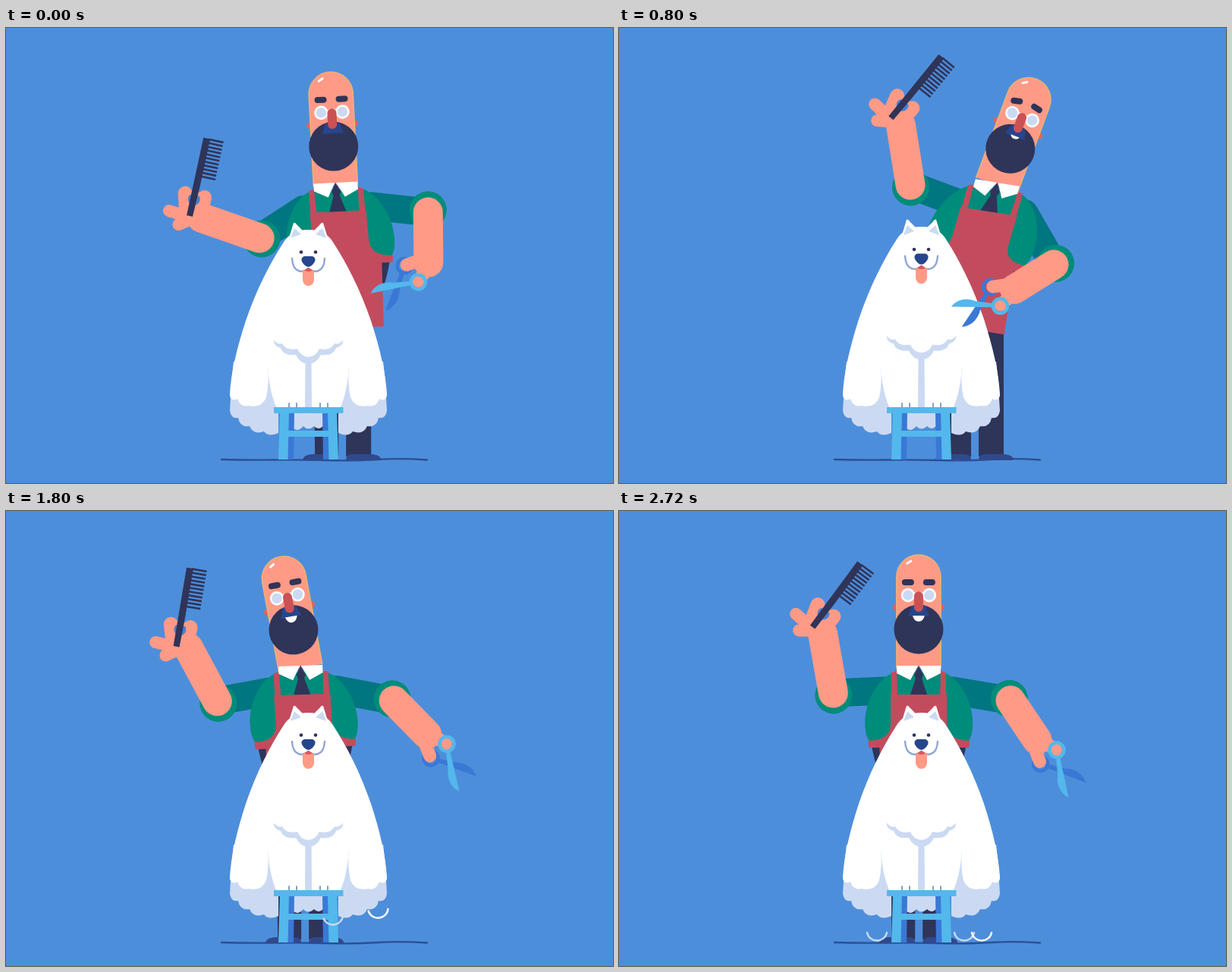
Write an HTML page with a canvas that moves like this. It is 800 px wide and 600 px high and loops after 2760 ms.

```html
<!DOCTYPE html>
<html lang="en">
<head>
<meta charset="utf-8">
<title>Dog groomer</title>
<style>
  html, body { margin: 0; width: 100%; height: 100%; overflow: hidden; background: #4d8edb; }
  canvas { display: block; }
</style>
</head>
<body>
<canvas id="stage" width="800" height="600"></canvas>
<script>
const ctx = document.getElementById('stage').getContext('2d');
const LOOP = 2760;
const RAD = Math.PI / 180;
const C = {
  bg: '#4d8edb', skin: '#ff9a86', dark: '#2f3459', green: '#008c7a', teal: '#007680',
  red: '#c24c5e', nose: '#cb5155', navy: '#27458c', grey: '#cbdaf2', white: '#fff',
  sky: '#53b8ec', blue: '#3a78d6', shoe: '#30498c', ground: '#2b4f96', line: '#8fa5d4'
};

// time, neck x, hip x, head tilt, smile, dog lift,
// left elbow x y, comb x y angle, right elbow x y, scissors x y angle
const KEYS = [
  [0,    434, 443, -2.9, 0, 0,     334, 277, 242, 247, -77,  556, 243, 514, 341, 140],
  [240,  478, 466, -9, 0, 0,       352, 274, 268, 246, -172, 586, 222, 568, 336, 115],
  [520,  466, 461, -7.7, 0, -1,    372, 278, 282, 246, -146, 572, 219, 560, 330, 97.5],
  [800,  498, 469, 20.4, .5, -4,   384, 207, 359, 118, -51,  573, 312, 473, 366, 152.5],
  [1240, 500, 469, 25.7, 1, -4.5,  386, 205, 369, 112, -29,  567, 320, 462, 361, 170],
  [1560, 449, 432, 21, 1, 0,       357, 183, 418, 112, 58,   558, 254, 489, 332, 159],
  [2080, 388, 394, -10.6, 1, 0,    278, 251, 224, 178, -81,  511, 250, 588, 336, 48],
  [2720, 394, 394, 0, 1, 0,        281, 239, 256, 150, -53,  515, 250, 585, 344, 47]
];
const smooth = p => p * p * (3 - 2 * p);
const linear = p => p;
// start, end and easing of the move that leaves each key
const MOVES = [
  [0, 240, p => p * (2 - p)], [240, 520, smooth], [540, 790, smooth], [800, 1240, smooth],
  [1300, 1540, smooth], [1560, 1810, smooth], [2080, 2720, linear], [2720, LOOP, linear]
];
// time, x, y of each falling tuft
const TUFTS = [
  [[1080, 432, 372], [1240, 374, 404], [1560, 334, 481], [2080, 333, 544], [2300, 340, 561]],
  [[960, 440, 376], [1240, 384, 467], [1560, 417, 526], [2080, 450, 556], [2300, 455, 561]],
  [[1280, 450, 376], [1560, 498, 513], [2080, 483, 552], [2300, 478, 561]]
];

const mix = (a, b, p) => a + (b - a) * p;
const clamp = p => Math.min(1, Math.max(0, p));

function poseAt(t) {
  let i = KEYS.length - 1;
  while (KEYS[i][0] > t) i--;
  const [start, end, ease] = MOVES[i];
  const p = ease(clamp((t - start) / (end - start)));
  const next = KEYS[(i + 1) % KEYS.length];
  return KEYS[i].map((v, k) => mix(v, next[k], p));
}

function fill(color, d) {
  ctx.fillStyle = color;
  ctx.fill(new Path2D(d));
}
function stroke(color, width, d) {
  ctx.strokeStyle = color;
  ctx.lineWidth = width;
  ctx.stroke(new Path2D(d));
}
function disc(color, x, y, r) {
  ctx.fillStyle = color;
  ctx.beginPath();
  ctx.arc(x, y, r, 0, 7);
  ctx.fill();
}
function ring(color, width, x, y, r) {
  ctx.strokeStyle = color;
  ctx.lineWidth = width;
  ctx.beginPath();
  ctx.arc(x, y, r, 0, 7);
  ctx.stroke();
}
const limb = (color, width, x1, y1, x2, y2) => stroke(color, width, `M${x1} ${y1}L${x2} ${y2}`);

function group(draw, x = 0, y = 0, angle = 0, sx = 1, sy = 1) {
  ctx.save();
  ctx.translate(x, y);
  ctx.rotate(angle * RAD);
  ctx.scale(sx, sy);
  draw();
  ctx.restore();
}
function skewed(draw, x, y, skewX, skewY) {
  ctx.save();
  ctx.transform(1, skewY, skewX, 1, x, y);
  draw();
  ctx.restore();
}
function mirrored(draw, axis) {
  draw();
  group(draw, axis * 2, 0, 0, -1, 1);
}
// Point given in a rotated local frame
function place(x, y, angle, lx, ly) {
  const c = Math.cos(angle * RAD), s = Math.sin(angle * RAD);
  return [x + lx * c - ly * s, y + lx * s + ly * c];
}

function forearm(ex, ey, wx, wy) {
  const d = Math.hypot(wx - ex, wy - ey);
  disc(C.green, ex - (wx - ex) / d * 3, ey - (wy - ey) / d * 3, 24.5);
  limb(C.skin, 39, ex, ey, wx, wy);
}

function legs() {
  fill(C.dark, 'M-64 -8H64Q60 30 38 80V260H5V100H-5V260H-36L-38 80Q-60 30-64 -8Z');
  fill(C.shoe, 'M5 264Q5 257 14 257H38Q51 258 51 265H5ZM-52 265Q-52 258-39 257H-14Q-5 257-5 264Z');
}

function torso() {
  fill(C.green, 'M-33 6C-55 14-71 45-71 72C-71 90-66 98-60 101H60C66 98 71 90 71 72C71 45 55 14 33 6Z');
  mirrored(() => fill(C.red, 'M-36 6L-29 4L-28 37H-36Z'), 0);
  fill(C.red, 'M-37 35H37V74C38 90 48 95 67 96L66 105H-66L-67 96C-48 95-38 90-37 74Z');
}

function collar() {
  fill(C.dark, 'M0 -3L6 9L4 14L11 35H-11L-4 14L-6 9Z');
  mirrored(() => fill(C.white, 'M-29 -3L-1 -3L-11 16L-29 7Z'), 0);
}

function head(tilt, smile) {
  const shape = 'M-29 0V-120A29 29 0 0 1 29 -120V0';
  mirrored(() => disc('#e5625f', -30, -80, 4), 0);
  fill(C.skin, shape + 'Z');
  stroke('#eab077', 1.8, shape);
  stroke(C.white, 3, 'M-15 -138L-10 -141');
  const brow = Math.max(0, tilt) * .65;
  for (const side of [-1, 1]) {
    group(() => limb(C.dark, 8, -4, 0, 4, 0), side * 14, -113, side * brow);
    disc(C.grey, side * 14, -96, 8);
    ring(C.white, 2.5, side * 14, -96, 8);
  }
  stroke(C.white, 2, 'M-6 -98Q0 -102 6 -98');
  disc(C.dark, 0, -51, 32.5);
  fill(C.navy, 'M-9 -82H9L14 -68H-14Z');
  limb(C.nose, 12, 0, -95, 0, -80);
  if (smile > 0) group(() => fill(C.white, 'M-8 0H8Q6 8 0 8Q-6 8-8 0Z'), 0, -69, 0, mix(.5, 1, smile), smile);
}

function combHand() {
  limb(C.skin, 16, 0, -28, -2, -4);
  limb(C.skin, 16, -15, -12, -5, 2);
  limb(C.skin, 19, 2, -5, 27, -12);
  limb(C.skin, 19, 2, 13, 27, 14);
  disc(C.skin, 0, 5, 13);
  disc('#4680cf', 22, 1, 8);
  limb(C.skin, 5, 29, -8, 30, 9);
  fill(C.dark, 'M-1 -4H104V5H40L-1 4Z');
  for (let i = 0; i < 11; i++) fill(C.dark, `M${52 + i * 5} 3h2.6v20h-2.6Z`);
}

function blade(color) {
  fill(color, 'M-21 -2H35C28 8 14 10 4 6L-21 3Z');
  ring(color, 4.5, -29.5, 0, 9.5);
}

function scissorHand(ex, ey, x, y, angle) {
  group(() => group(() => blade(C.blue), 0, 0, -28.5, 1, -1), x, y, angle);
  forearm(ex, ey, ...place(x, y, angle, -53, -3));
  group(() => {
    limb(C.skin, 17, -48, -8, -27, -13);
    limb(C.skin, 17, -48, 6, -29, 13);
    group(() => blade(C.sky), 0, 0, 28.5);
  }, x, y, angle);
}

function dogFace(blink) {
  mirrored(() => {
    fill(C.white, 'M371 283L379 257Q381 256 383 259L395 271Z');
    fill(C.grey, 'M375 277L380 264L389 272Z');
    if (blink) stroke(C.dark, 1.5, 'M387 295Q389 293 391 295');
    else disc(C.dark, 389, 295.5, 2.3);
  }, 398.5);
  stroke(C.line, 2.4, 'M377 304C378 324 392 323 398.5 317C405 323 419 324 420 304');
  fill(C.skin, 'M391 320Q398.5 315 406 320V332A7.5 8 0 0 1 391 332Z');
  fill('#d9575a', 'M393 319.5L398.5 316L404 319.5Q398.5 323 393 319.5Z');
  fill(C.navy, 'M393 301H404Q409 303 407 308Q403 315 398.5 315Q394 315 390 308Q388 303 393 301Z');
}

function dog(lift, blink) {
  fill(C.grey, 'M378 505H420V523Q412 532 406 525Q398 532 392 525Q384 534 378 527Z');
  mirrored(() => fill(C.grey,
    'M297 470L295 505Q297 516 306 514Q308 527 321 525Q326 537 340 532Q346 540 359 534V470Z'), 398.5);
  group(() => {
    fill(C.white, 'M295 485C296 455 305 420 316 386C330 345 348 310 365 284Q375 266 398.5 266' +
      'Q422 266 432 284C449 310 467 345 481 386C492 420 501 455 502 485L443 500H356Z');
    dogFace(blink);
  }, 0, -500 * -lift / -235 * -1 + 0 * lift, 0, 1, 1 - lift / 235);
  mirrored(() => {
    fill(C.grey, 'M345 446Q347 480 357 502H320L300 470Z');
    fill(C.white, 'M300 440L295 485Q297 493 305 489Q309 501 320 498Q337 502 343 487Q347 470 345 446Z');
    stroke('#8294ba', 1.8, 'M373 495V500M383 495V500');
  }, 398.5);
  group(() => {
    mirrored(() => fill(C.grey, 'M353 411Q352 419 362 422Q366 433 382 431Q388 443 399 443V434' +
      'Q388 433 384 423Q369 426 364 416Q357 418 353 411Z'), 398.5);
  }, 0, lift * 1.4);
  fill(C.grey, 'M394.5 436H402.5L403 500H394Z');
}

function stool() {
  mirrored(() => {
    fill(C.blue, 'M371 506H380L379 569H371Z');
    fill(C.sky, 'M361 505H373L371.5 569H359Z');
  }, 398.5);
  fill(C.sky, 'M368 531H430V539H368ZM353 500H444.5V508H353Z');
}

function tuft(points, index, t) {
  if (t < points[0][0]) return;
  let i = 0;
  while (i < points.length - 2 && points[i + 1][0] <= t) i++;
  const [t0, x0, y0] = points[i], [t1, x1, y1] = points[i + 1];
  const p = clamp((t - t0) / (t1 - t0));
  const sway = 16 * Math.sin(t / 180 + index) * clamp((2200 - t) / 600);
  group(() => stroke(index === 2 ? C.white : C.grey, 2.4, 'M-13 -5C-10 9 10 9 13 -5'),
    mix(x0, x1, p), mix(y0, y1, p), sway);
}

function draw(t) {
  const [, nx, hip, tilt, smile, lift, lx, ly, cx, cy, ca, rx, ry, sx, sy, sa] = poseAt(t);
  const lean = (hip - nx) / 98, drop = -.55 * lean;
  const shoulder = side => [nx + side * 45 + lean * 30, 237 + drop * side * 45];
  ctx.fillStyle = C.bg;
  ctx.fillRect(0, 0, 800, 600);
  ctx.lineCap = ctx.lineJoin = 'round';

  stroke(C.ground, 2.4, 'M284 569Q320 570 350 569.5T420 570T490 569T555 569.5');
  group(legs, hip, 305);
  limb(C.teal, 37, ...shoulder(-1), lx, ly);
  limb(C.teal, 37, ...shoulder(1), rx, ry);
  skewed(() => fill(C.red, 'M-52 -6H52L51 91H-51Z'), hip, 305, lean * .45, drop);
  skewed(torso, nx, 207, lean, drop);
  group(() => head(tilt, smile), nx, 207, tilt);
  skewed(collar, nx, 207, lean, drop);
  forearm(lx, ly, ...place(cx, cy, ca, 0, 16));
  group(combHand, cx, cy, ca);
  dog(lift, t >= 440 && t < 600);
  stool();
  scissorHand(rx, ry, sx, sy, sa);
  TUFTS.forEach((points, i) => tuft(points, i, t));
}

function frame() {
  draw(performance.now() % LOOP);
  requestAnimationFrame(frame);
}
frame();
</script>
</body>
</html>
```
